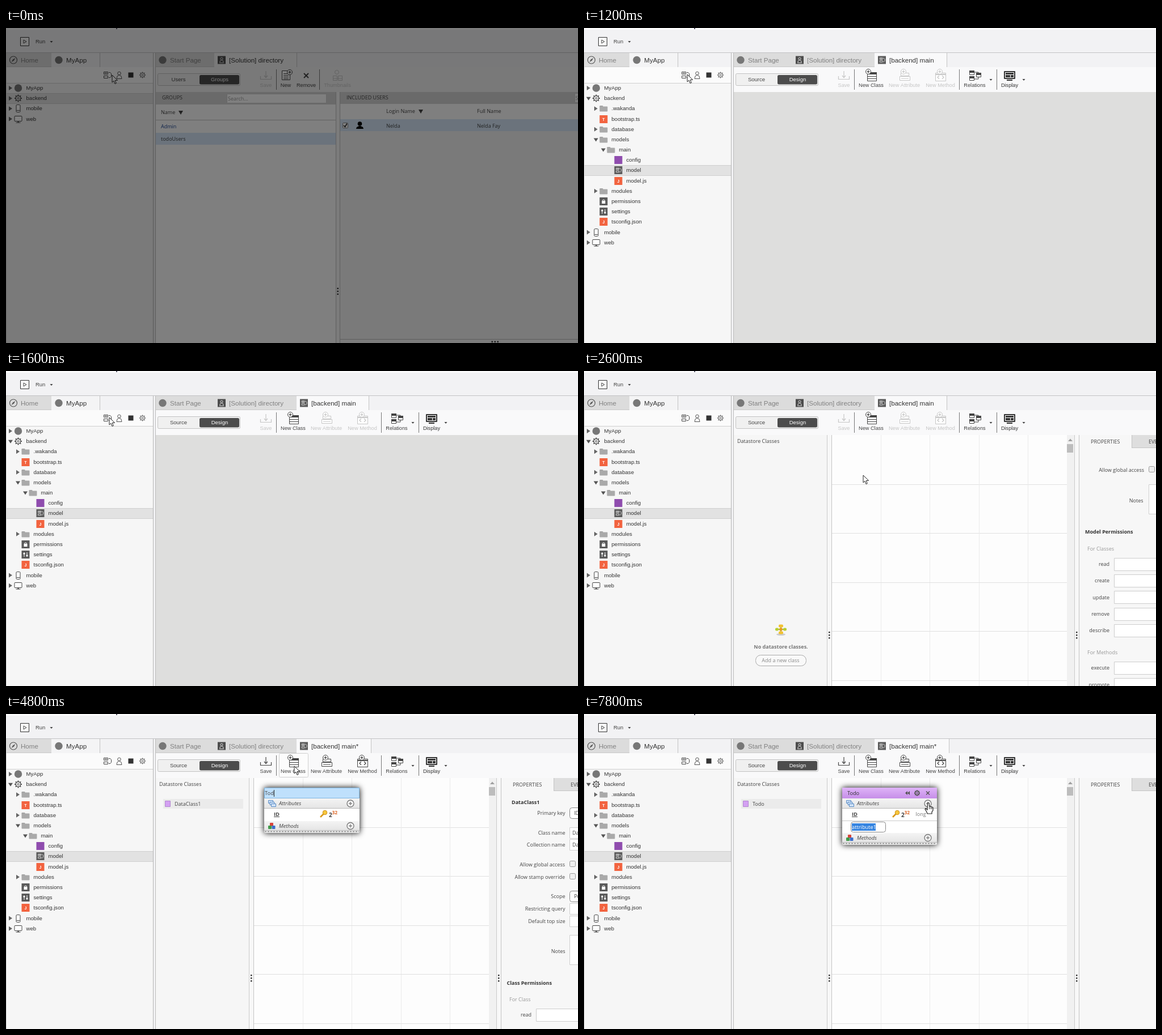
Write an HTML page with a canvas that moves like this. It is 1008 by 556 pixels and loops after 8000 ms.

```html
<!DOCTYPE html>
<html lang="en">
<head>
<meta charset="utf-8">
<title>Model designer</title>
<style>
html, body { margin: 0; width: 100%; height: 100%; overflow: hidden; background: #f2f2f4; }
canvas { display: block; }
</style>
</head>
<body>
<canvas id="stage" width="1008" height="556"></canvas>
<script>
const ctx = document.getElementById('stage').getContext('2d');
const ARIAL = '"Liberation Sans", Arial, sans-serif';
const OPEN = '"Open Sans", sans-serif';
const STEP = 200, LOOP = 8000;
// Step numbers at which the interface changes
const AT = { tree: 5, tab: 6, designer: 9, create: 18, typing: 22, commit: 26, attribute: 35 };
const INK = '#444', OFF = '#c6c6c6', SELECT = '#3584e0';

// ---- drawing helpers ----
function box(x, y, w, h, fill, stroke, r = 0) {
  ctx.beginPath();
  if (stroke) ctx.roundRect(x + .5, y + .5, w - 1, h - 1, r);
  else ctx.roundRect(x, y, w, h, r);
  if (fill) { ctx.fillStyle = fill; ctx.fill(); }
  if (stroke) { ctx.strokeStyle = stroke; ctx.lineWidth = 1; ctx.stroke(); }
}
function poly(points, fill, stroke, width = 1, close = true) {
  ctx.beginPath();
  points.forEach(([x, y]) => ctx.lineTo(x, y));
  if (close) ctx.closePath();
  if (fill) { ctx.fillStyle = fill; ctx.fill(); }
  if (stroke) { ctx.strokeStyle = stroke; ctx.lineWidth = width; ctx.stroke(); }
}
const line = (x1, y1, x2, y2, color, width = 1) => poly([[x1, y1], [x2, y2]], null, color, width, false);
function disc(x, y, r, fill, stroke, width = 1) {
  ctx.beginPath();
  ctx.arc(x, y, r, 0, Math.PI * 2);
  if (fill) { ctx.fillStyle = fill; ctx.fill(); }
  if (stroke) { ctx.strokeStyle = stroke; ctx.lineWidth = width; ctx.stroke(); }
}
function text(s, x, cy, { size = 9, font = OPEN, color = INK, align = 'left', style = '' } = {}) {
  ctx.font = `${style} ${size}px ${font}`;
  ctx.fillStyle = color;
  ctx.textAlign = align;
  ctx.fillText(s, x, cy + size * .36);
}
function dots(x, y, vertical = true) {
  for (let i = -1; i < 2; i++) box(x - 1 + (vertical ? 0 : i * 5), y - 1 + (vertical ? i * 5 : 0), 2.5, 2.5, '#333', null, .6);
}
function at(x, y, draw) {
  ctx.save();
  ctx.translate(x, y);
  draw();
  ctx.restore();
}

// ---- icons, centred on the origin ----
function gear(color, r, width = 1.2) {
  for (let i = 0; i < 8; i++) {
    const c = Math.cos(i * Math.PI / 4), s = Math.sin(i * Math.PI / 4);
    line(c * r * .65, s * r * .65, c * r, s * r, color, width * 1.5);
  }
  disc(0, 0, r * .68, null, color, width);
  disc(0, 0, r * .25, null, color, 1);
}
function person(color, fill) {
  disc(0, -3, 2.8, fill, color);
  poly([[-4.5, 6.5], [-3.5, 2], [-1, .3], [1, .3], [3.5, 2], [4.5, 6.5]], fill, color);
}
function model(color, s = 1) {
  ctx.scale(s, s);
  box(-6, -6, 8, 5, null, color);
  box(-6, 1, 8, 5, null, color);
  poly([[3, -4.5], [5.5, -4.5], [7.5, -2.5], [7.5, 2.5], [5.5, 4.5], [3, 4.5]], null, color, 1, false);
  line(-4, -3.5, 0, -3.5, color);
}
function folder() {
  box(-7, -5, 6, 3, '#a3a3a3', null, 1);
  box(-7, -3.5, 14, 9, '#a9a9a9', null, 1);
}
function tile(color, letter) {
  box(-7, -7, 14, 14, color);
  if (letter) text(letter, 0, 0, { size: 7, font: ARIAL, color: '#fff', align: 'center', style: 'bold' });
}
function modelTile() { tile('#5a5a5a'); model('#fff', .68); }
function personTile() { tile('#4c4c4c'); ctx.scale(.75, .75); person('#fff'); }
function compass() {
  disc(0, 0, 6.5, null, '#555', 1.2);
  poly([[3.5, -3.5], [1, 1], [-3.5, 3.5], [-1, -1]], '#555');
}
const mark = () => disc(0, 0, 6.7, '#777');
const icons = {
  mark, folder, model: modelTile,
  gear: () => gear('#4a4a4a', 6.5),
  T: () => tile('#f2633f', 'T'),
  J: () => tile('#f2633f', 'J'),
  violet: () => tile('#8f4cae'),
  phone() { box(-4, -7, 8, 14, '#fff', '#444', 1.5); line(-3, 3.5, 3, 3.5, '#444'); },
  screen() { box(-7, -6, 14, 10, '#fff', '#444', 1); line(-4, 6, 4, 6, '#444'); line(0, 4, 0, 6, '#444', 2); },
  lock() { tile('#5a5a5a'); box(-3, -1, 6, 5, '#fff'); ctx.beginPath(); ctx.arc(0, -1, 2, Math.PI, 0); ctx.strokeStyle = '#fff'; ctx.stroke(); },
  sliders() { tile('#5a5a5a'); for (const x of [-2.5, 2.5]) { line(x, -4, x, 4, '#fff'); disc(x, x * .7, 1.6, '#fff'); } }
};
function plus(x, y, color) {
  disc(x, y, 4.5, '#fff', color);
  line(x - 2.5, y, x + 2.5, y, color, 1.3);
  line(x, y - 2.5, x, y + 2.5, color, 1.3);
}
const tools = {
  save(c) { poly([[-9.5, 1], [-9.5, 6.5], [9.5, 6.5], [9.5, 1]], null, c, 1.2, false); line(0, -8, 0, 3, c, 1.2); poly([[-3, 0], [0, 3.5], [3, 0]], null, c, 1.2, false); },
  page(c) { box(-7, -9, 15, 17, '#fff', c); for (let y = -4; y < 6; y += 3) line(-4, y + .5, 5, y + .5, c); plus(7, -6, c); },
  remove(c) { line(-4, -4, 4, 4, c, 2); line(-4, 4, 4, -4, c, 2); },
  thumbs(c) { disc(-1, -6, 3.5, null, c); box(-8, 0, 8, 9, null, c); box(1, 0, 8, 9, null, c); line(-8, 5, 9, 5, c); },
  klass(c) { box(-7, -6, 17, 16, '#fff', c); box(-7, -6, 17, 4, c); for (const y of [1.5, 5.5]) line(-7, y, 10, y, c); plus(-5, -7, c); },
  attr(c) { box(-7, -5, 15, 6, '#fff', c); box(-9, 1, 19, 8, '#fff', c); line(-6, 5, 7, 5, c); plus(-2, -7, c); },
  method(c) { box(-9, -5, 19, 15, '#fff', c); line(-9, -2, 10, -2, c, 2); poly([[-2, 0], [-5, 3], [-2, 6]], null, c, 1.3, false); poly([[3, 0], [6, 3], [3, 6]], null, c, 1.3, false); plus(-1, -7, c); },
  relations(c) { poly([[-1, -6], [6, -6], [6, 6], [-1, 6]], null, c, 1, false); for (const [x, y] of [[-10, -9], [2, -5], [-10, 1]]) { box(x, y, 9, 8, '#fff', c); box(x, y, 9, 4, c); } },
  display(c) { box(-10, -8, 20, 14, c, null, 1); box(-8, -6, 16, 10, '#fff'); box(-7, -5, 14, 3, c); box(-7, -1, 8, 4, c); box(2, -1, 5, 4, c); box(-5, 7, 10, 2, c); }
};
function caret(x, y) { poly([[x - 2.5, y - 1], [x + 2.5, y - 1], [x, y + 2]], '#444'); }
function tool(name, label, x, color = INK) {
  at(Math.round(x), 84, () => tools[name](color));
  text(label, x, 101, { size: 9.2, font: ARIAL, color, align: 'center' });
}

// ---- chrome ----
function tab(x, w, label, fill, icon) {
  box(x, 44, w, 25, fill || '#dcdcdc');
  line(x + w - .5, 44, x + w - .5, 69, '#c4c4c4');
  if (!fill) line(x, 68.5, x + w, 68.5, '#c9c9c9');
  at(x + 13, 56.5, icon);
  text(label, x + 26, 56.5, { size: 11.6, font: ARIAL, color: fill ? '#333' : '#808080' });
}
function topBar() {
  box(0, 0, 1008, 556, '#f2f2f4');
  box(0, 0, 1008, 3, '#fcfcfc');
  box(194, 0, 2, 2, '#556');
  box(25, 16, 16, 16, '#fafafa', '#333');
  poly([[31, 21], [36, 24], [31, 27]], null, '#444');
  text('Run', 52, 24, { size: 9.4, font: ARIAL });
  caret(80, 24);
  line(0, 43.5, 1008, 43.5, '#c3c3c5');
}
const root = [['mark', 'MyApp', 0, 'r'], ['gear', 'backend', 0, 'r']];
const tail = [['phone', 'mobile', 0, 'r'], ['screen', 'web', 0, 'r']];
const files = [
  ['folder', '.wakanda', 1, 'r'], ['T', 'bootstrap.ts', 1], ['folder', 'database', 1, 'r'],
  ['folder', 'models', 1, 'd'], ['folder', 'main', 2, 'd'], ['violet', 'config', 3],
  ['model', 'model', 3], ['J', 'model.js', 3], ['folder', 'modules', 1, 'r'],
  ['lock', 'permissions', 1], ['sliders', 'settings', 1], ['J', 'tsconfig.json', 1]
];
function sidebar(open) {
  tab(0, 81, 'Home', null, compass);
  tab(80, 86, 'MyApp', '#f4f4f5', mark);
  box(0, 69, 260, 28, '#fbfbfb');
  box(0, 97, 260, 459, '#f6f6f6');
  line(0, 97.5, 260, 97.5, '#cfcfcf');
  at(178, 83, () => model('#444'));
  at(199.5, 83, () => person('#555'));
  box(215.5, 78.5, 9, 9, '#333');
  at(240.5, 83, () => gear('#666', 5.5, 1));
  const rows = open ? [...root, ...files, ...tail] : [...root, ...tail];
  const chosen = open ? 8 : 1;
  rows.forEach(([icon, label, depth, arrow], i) => {
    const y = 106 + i * 18.18, x = depth * 13;
    if (i === chosen) {
      box(0, Math.round(y - 9), 260, 19, '#e2e2e2');
      for (const e of [-9, 9]) line(0, Math.round(y + e) + .5, 260, Math.round(y + e) + .5, '#d0d0d0');
    }
    const down = open && label === 'backend' || arrow === 'd';
    if (down) poly([[x + 4, y - 2.5], [x + 12, y - 2.5], [x + 8, y + 3.5]], '#555');
    else if (arrow) poly([[x + 5, y - 4], [x + 11, y], [x + 5, y + 4]], '#666');
    at(x + 21.5, Math.round(y), icons[icon]);
    text(label, x + 35.5, Math.round(y), { size: 9.6, font: ARIAL, color: '#333' });
  });
  line(.5, 44, .5, 556, '#cfcfcf');
  line(259.5, 44, 259.5, 556, '#b5b5b5');
}
function workTabs(withModel, dirty) {
  const fill = withModel ? '#f9f9fa' : '#f4f4f4';
  tab(263, 105, 'Start Page', null, mark);
  tab(367, 146, '[Solution] directory', withModel ? null : fill, personTile);
  if (withModel) tab(512, dirty ? 132 : 128, '[backend] main' + (dirty ? '*' : ''), fill, modelTile);
  box(264, 69, 744, 44, fill);
  line(263.5, 44, 263.5, 556, '#bdbdbd');
}
function segments(left, right) {
  box(267, 80, 146, 22, '#f0f0f0', '#c2c2c2', 2);
  box(341, 83, 70, 16.5, '#4c4c4c', null, 2.5);
  text(left, 304, 91, { size: 9.5, font: ARIAL, align: 'center' });
  text(right, 376.5, 91, { size: 9.5, font: ARIAL, align: 'center', color: '#fff' });
}
const separator = x => line(x + .5, 73, x + .5, 109, '#777');

// ---- directory view ----
function directory() {
  segments('Users', 'Groups');
  tool('save', 'Save', 458, OFF);
  separator(476);
  tool('page', 'New', 493);
  tool('remove', 'Remove', 529);
  separator(552);
  tool('thumbs', 'Thumbnails', 584, OFF);

  box(264, 113, 317, 443, '#fff');
  box(264, 113, 317, 22, '#d6d6d6');
  text('GROUPS', 275, 123);
  box(389, 116, 176, 17, '#fff', '#cfcfcf');
  text('Search...', 391, 125, { color: '#999' });
  text('Name', 273, 149);
  poly([[304, 146], [312, 146], [308, 153]], '#444');
  line(264, 162.5, 581, 162.5, '#c4c4c4');
  text('Admin', 273, 174, { color: '#1b4594' });
  box(264, 185, 317, 21, '#d7e8fa');
  text('todoUsers', 273, 196);

  box(581, 113, 8, 443, '#f8f8f8');
  line(581.5, 113, 581.5, 556, '#c0c0c0');
  line(588.5, 113, 588.5, 556, '#c0c0c0');
  dots(584.5, 464.5);

  box(589, 113, 419, 436, '#f6f6f6');
  box(589, 113, 419, 21, '#d6d6d6');
  text('INCLUDED USERS', 600, 122.5);
  box(1002, 115, 10, 17, '#fff', '#cfcfcf');
  text('Search...', 1003.5, 124, { color: '#999' });
  box(589, 134, 419, 27, '#fff');
  text('Login Name', 670, 147, { size: 9.1 });
  poly([[727, 144], [735, 144], [731, 151]], '#444');
  text('Full Name', 830, 146.5, { size: 9.1 });
  box(589, 161, 419, 21, '#d7e8fa');
  box(593, 167, 10, 10, '#fff', '#888', 1);
  poly([[595, 172], [597.5, 174.5], [601, 168.5]], null, '#222', 1.6, false);
  disc(623.5, 169, 3.8, '#000');
  poly([[617, 178], [618, 175], [622, 173], [625, 173], [629, 175], [630, 178]], '#000');
  text('Nelda', 670, 172.5);
  text('Nelda Fay', 830, 172.5);
  box(589, 549, 419, 7, '#fafafa');
  line(589, 549.5, 1008, 549.5, '#bbb');
  dots(861.5, 553.5, false);
}

// ---- designer view ----
function designTools(dirty, hover) {
  segments('Source', 'Design');
  if (hover) box(481, 69, 52, 43, '#fcfcfc', '#d0d0d0', 2);
  const state = dirty ? INK : OFF;
  tool('save', 'Save', 458, state);
  separator(476);
  tool('klass', 'New Class', 506);
  tool('attr', 'New Attribute', 564.5, state);
  tool('method', 'New Method', 628, state);
  separator(661);
  tool('relations', 'Relations', 688.5);
  caret(717, 91);
  separator(727);
  tool('display', 'Display', 750, '#333');
  caret(775, 91);
}
function splitter(x) {
  box(x, 113, 9, 443, '#f8f8f8');
  line(x + .5, 113, x + .5, 556, '#cacaca');
  line(x + 8.5, 113, x + 8.5, 556, '#c4c4c4');
  dots(x + 4, 466);
}
function classList(name) {
  box(264, 113, 164, 443, '#f6f6f6');
  text('Datastore Classes', 270, 124);
  if (name) {
    box(277, 150, 141, 17, '#ebebeb');
    box(280, 153, 10, 11, '#d3a0f2', '#b287d0');
    text(name, 297, 158.5);
    return;
  }
  ctx.fillStyle = '#ccc';
  ctx.beginPath();
  ctx.ellipse(347, 465, 8, 2, 0, 0, 7);
  ctx.fill();
  line(339, 456, 355, 456, '#8a9a30', 1.5);
  line(347, 449, 347, 463, '#8a9a30', 1.5);
  for (const y of [450, 462]) box(343, y - 2.5, 8, 5, '#f2c230', null, 2);
  for (const x of [340, 354]) box(x - 3, 453.5, 6, 5, '#b8cf2e', null, 2);
  box(344.5, 453.5, 5, 5, '#ee9a1f', null, 1);
  text('No datastore classes.', 347, 487, { style: 'bold', color: '#777', align: 'center' });
  box(302, 501, 90, 20, '#f9f9f9', '#aaa', 9);
  text('Add a new class', 346.5, 511, { color: '#888', align: 'center' });
}
function grid() {
  box(437, 113, 414, 443, '#fdfdfd');
  for (let i = 1; i < 6; i++) {
    const p = Math.round(i * 86.6);
    if (i < 5) line(437 + p - .5, 113, 437 + p - .5, 556, '#ebebeb');
    line(437, 113 + p + .5, 851, 113 + p + .5, '#e0e0e0');
  }
  box(851, 113, 13, 443, '#f1f1f1');
  poly([[853, 124], [861, 124], [857, 119.5]], '#a0a0a0');
  box(851, 129, 11, 15, '#bdbdbd');
}
function field(label, y, value, round) {
  text(label, 985.5, y, { align: 'right' });
  box(993, Math.round(y) - 10, 40, 20, '#fff', round ? '#888' : '#cfcfcf', round ? 4 : 0);
  if (value) text(value, round ? 1001 : 998, y);
}
function check(label, y, x) {
  text(label, x - 8, y, { align: 'right' });
  box(x, Math.round(y) - 7, 11, 11, '#eee', '#999', 2);
}
function notes(y, x) {
  text('Notes', 985.5, y, { align: 'right' });
  box(x, Math.round(y) - 29, 40, 53, '#fff', '#cfcfcf');
}
function permissions(names, y, gap) {
  names.forEach((name, i) => {
    text(name, 926, y + i * gap, { align: 'right' });
    box(934, Math.round(y + i * gap) - 11, 90, 23, '#fff', '#cdcdcd');
  });
}
function properties(kind, name) {
  box(873, 113, 135, 443, '#f7f7f7');
  box(965, 113, 43, 23, '#dedede');
  line(965.5, 113, 965.5, 136, '#c4c4c4');
  line(965, 135.5, 1008, 135.5, '#c4c4c4');
  text('PROPERTIES', 893, 125);
  text('EVENTS', 995, 125);
  const heading = { style: 'bold', color: '#333' }, faint = { color: '#999' };
  if (kind === 'model') {
    check('Allow global access', 174.5, 995);
    notes(228.5, 995);
    text('Model Permissions', 883, 284, heading);
    text('For Classes', 887, 313.5, faint);
    permissions(['read', 'create', 'update', 'remove', 'describe'], 340.5, 29.4);
    text('For Methods', 887, 497, faint);
    permissions(['execute', 'promote'], 524, 29.4);
  } else if (kind === 'class') {
    text(name, 891, 156, heading);
    field('Primary key', 175, 'ID', true);
    field('Class name', 209.5, name);
    field('Collection name', 231, name + 'Collection');
    check('Allow global access', 266, 993);
    check('Allow stamp override', 287.5, 993);
    field('Scope', 322, 'Public', true);
    field('Restricting query', 344);
    field('Default top size', 365.5);
    notes(419, 993);
    text('Class Permissions', 882.5, 475, heading);
    text('For Class', 887, 504, faint);
    permissions(['read'], 531, 29.4);
  }
}
function addButton(x, y) {
  disc(x, y, 6, '#f5f5f5', '#777', 1.3);
  line(x - 3, y, x + 3, y, '#777', 1.3);
  line(x, y - 3, x, y + 3, '#777', 1.3);
}
function band(y, h, label, w) {
  const g = ctx.createLinearGradient(0, y, 0, y + h);
  g.addColorStop(0, '#f4f4f4');
  g.addColorStop(1, '#e4e4e4');
  box(455, y, w, h, g);
  line(455, y + h - .5, 455 + w, y + h - .5, '#bbb');
  text(label, 481, y + h / 2, { style: 'italic', size: 9.2 });
  addButton(w + 439, y + h / 2);
}
function titleBar(n, w) {
  if (n < AT.commit) {
    box(455, 130, w, 19, '#bfe0fc', '#7fb5e0');
    const typed = n < AT.typing ? 'DataClass1' : 'Todo'.slice(0, n - AT.typing + 1);
    ctx.font = '9.4px ' + OPEN;
    const end = 456 + ctx.measureText(typed).width;
    if (n < AT.typing) box(456, 133, end - 456, 13, SELECT);
    else line(end + .5, 134, end + .5, 146, '#222');
    text(typed, 456, 139.5, { size: 9.4, color: n < AT.typing ? '#fff' : INK });
    return;
  }
  const g = ctx.createLinearGradient(0, 130, 0, 149);
  g.addColorStop(0, '#dfb4f8');
  g.addColorStop(1, '#c68ee8');
  box(455, 130, w, 19, g);
  text('Todo', 464, 139.5, { size: 9.2, color: '#333' });
  const x = 455 + w, dir = n < AT.attribute ? 1 : -1;
  for (const d of [-2, 2]) poly([[x - 52 + d - 2 * dir, 136], [x - 52 + d + 2 * dir, 139.5], [x - 52 + d - 2 * dir, 143]], '#555');
  at(x - 35, 139.5, () => gear('#555', 5, 1.5));
  at(x - 16, 139.5, () => { ctx.scale(.75, .75); tools.remove('#555'); });
}
function classWindow(n) {
  const more = n >= AT.attribute, w = more ? 167 : 168, shift = more ? -10 : 0;
  const methods = more ? 210 : 189, bottom = methods + 21;
  ctx.save();
  ctx.shadowColor = '#000';
  ctx.shadowBlur = 11;
  box(455, 130, w, bottom - 130, '#e9e9e9', null, 2);
  ctx.restore();
  titleBar(n, w);
  band(149, 18, 'Attributes', w);
  for (const i of [0, 1, 2]) box(462 + i * 2.5, 152 + i * 3, 9, 6, '#cfe2f8', '#5b8cc4');
  box(455, 167, w, methods - 167, '#fff');
  text('ID', 472, 177, { size: 9.4, style: 'bold' });
  line(472, 181.5, 482, 181.5, INK);
  line(561 + shift, 175, 554 + shift, 182, '#d99a1c', 2.6);
  disc(562 + shift, 174, 3.8, '#f6c73c', '#cf8f18');
  text('2', 569 + shift, 178, { size: 10, style: 'bold' });
  text('32', 574.5 + shift, 174, { size: 8.5, style: 'bold', color: '#dd6a2c' });
  if (more) {
    text('long', 584.5, 177, { color: '#777' });
    line(455, 188.5, 455 + w, 188.5, '#ccc');
    box(470, 190, 62, 19, '#fff', '#888', 4);
    box(472, 193, 42, 13, SELECT);
    text('attribute1', 472, 199.5, { size: 9.3, color: '#fff' });
  }
  band(methods, 17, 'Methods', w);
  box(465, methods + 3, 6, 6, '#d8453a', null, 1);
  box(462, methods + 8, 6, 6, '#3f9b4a', null, 1);
  box(468.5, methods + 8, 6, 6, '#3b6fc9', null, 1);
  ctx.setLineDash([3, 2]);
  line(456, bottom - 2.5, 454 + w, bottom - 2.5, '#888', 1.5);
  ctx.setLineDash([]);
}
function designer(n) {
  const created = n >= AT.create;
  const name = created ? (n < AT.commit ? 'DataClass1' : 'Todo') : '';
  designTools(created, n >= 16 && n < 28);
  if (n < AT.designer) {
    box(264, 113, 744, 443, '#dededd');
    return;
  }
  classList(name);
  grid();
  splitter(428);
  splitter(864);
  properties(n >= AT.attribute ? '' : created ? 'class' : 'model', name);
  if (created) classWindow(n);
}

// ---- pointer ----
// step, x, y
const path = [[0, 187, 83], [1, 187, 83], [4, 182, 82], [9, 182, 82], [12, 492, 184], [13, 492, 184], [16, 508, 92], [27, 508, 92], [31, 606, 157], [39, 607, 157]];
function pointer(n) {
  const i = Math.max(1, path.findIndex(p => p[0] >= n));
  const [a, ax, ay] = path[i - 1], [b, bx, by] = path[i];
  const u = (n - a) / (b - a), k = u * u * (3 - 2 * u);
  at(ax + (bx - ax) * k, ay + (by - ay) * k, () => {
    if (n < 31) {
      poly([[0, 0], [0, 13], [3, 10.3], [5, 15.5], [7.3, 14.5], [5.2, 9.6], [9.5, 9.3]], '#fff', '#222', 1);
      return;
    }
    poly([[-1.5, 0], [1, 0], [1.5, 6], [4, 6.3], [6, 7], [8, 8], [8, 13], [6, 16], [6, 19], [-2, 19], [-3, 16], [-6, 11], [-5, 9.5], [-2, 12]], '#fff', '#222', 1.2);
    for (const x of [1.5, 4, 6]) line(x, 7, x, 11, '#444');
  });
}

function draw(n) {
  topBar();
  sidebar(n >= AT.tree);
  workTabs(n >= AT.tab, n >= AT.create);
  if (n < AT.tab) directory();
  else designer(n);
  pointer(n);
  if (n === 0) box(0, 0, 1008, 556, 'rgba(0,0,0,.5)');
}
const start = performance.now();
function tick() {
  const t = Math.max(0, performance.now() - start) % LOOP;
  draw(Math.floor(t / STEP));
  requestAnimationFrame(tick);
}
tick();
</script>
</body>
</html>
```
